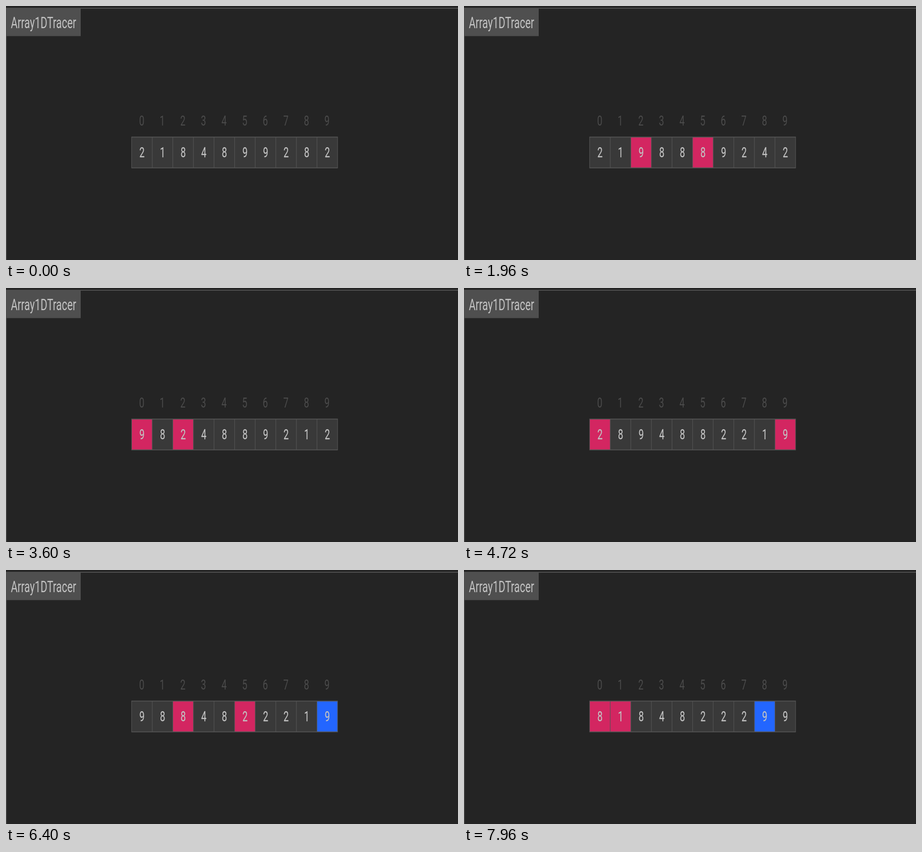
An HTML page for the animation above (8 s loop, 998 by 561 pixels).

```html
<!DOCTYPE html>
<html lang="en">
<head>
<meta charset="utf-8">
<title>Array tracer</title>
<style>
  html, body { margin: 0; width: 100%; height: 100%; overflow: hidden; background: #242424; }
  svg { display: block; width: 998px; height: 561px; }
  text { font-family: Roboto, sans-serif; font-size: 12.6px; fill: #c2c2c2; }
  .mid { text-anchor: middle; }
  .value { stroke: #c2c2c2; stroke-width: 0.12px; }
  .index { fill: #4b4b4b; }
  .title { font-size: 14px; }
</style>
</head>
<body>
<svg id="stage" viewBox="0 0 998 561">
  <rect y="4" width="998" height="2" fill="#505050"/>
  <rect y="4" width="1.4" height="557" fill="#505050"/>
  <rect y="6" width="165" height="60.5" fill="#4f4f4f"/>
</svg>
<script>
const LOOP = 8000, FRAME = 40;
const LEFT = 277.4, PITCH = 45.47, TOP = 289.5, HEIGHT = 68;
const GREY = '#393939', RED = '#d32661', BLUE = '#2366ff', LINE = '#555';
const start = [...'2184899282'];
const stage = document.getElementById('stage');

function add(tag, attrs, content = '') {
  const el = document.createElementNS('http://www.w3.org/2000/svg', tag);
  for (const key in attrs) el.setAttribute(key, attrs[key]);
  el.textContent = content;
  return stage.appendChild(el);
}

function rect(x, y, width, height, fill) {
  return add('rect', { x, y, width, height, fill });
}

function label(x, y, cls, content) {
  return add('text', { class: cls, transform: `translate(${x} ${y}) scale(1.625 2.45)` }, content);
}

// Run a heap sort and record the array and highlights at every step
function traceSort(input) {
  const values = [...input], states = [];
  let selected = -1;

  const record = patched => states.push({ values: [...values], patched, selected });

  function swap(a, b) {
    [values[a], values[b]] = [values[b], values[a]];
    record([a, b]);
  }

  function heapify(size, root) {
    let largest = root;
    for (const child of [2 * root + 1, 2 * root + 2])
      if (child < size && values[child] > values[largest]) largest = child;
    if (largest === root) return;
    swap(root, largest);
    heapify(size, largest);
  }

  record([]);
  for (let i = Math.ceil(values.length / 2) - 1; i >= 0; i--) heapify(values.length, i);
  for (let last = values.length - 1; last > 0; last--) {
    selected = -1;
    swap(0, last);
    selected = last;
    record([]);
    heapify(last, 0);
  }
  return states;
}

const states = traceSort(start);
const stepTime = k => k && FRAME * Math.round(22.25 + 13.6 * k);

label(10.7, 48.7, 'title', 'Array1DTracer');
const boxes = start.map((_, i) => rect(LEFT + i * PITCH, TOP, PITCH, HEIGHT, GREY));
for (let i = 0; i <= start.length; i++)
  rect(LEFT + i * PITCH - 0.6, TOP, 1.2, HEIGHT, LINE);
for (const y of [TOP, TOP + HEIGHT])
  rect(LEFT - 0.6, y - 0.9, PITCH * start.length + 1.2, 1.8, LINE);

const digits = start.map((_, i) => {
  const x = LEFT + (i + 0.5) * PITCH;
  label(x - 0.5, 263.7, 'mid index', i);
  return label(x + 0.2, 333.8, 'mid value');
});

function draw(time) {
  const { values, patched, selected } = states.findLast((_, k) => stepTime(k) <= time);
  values.forEach((value, i) => {
    digits[i].textContent = value;
    boxes[i].setAttribute('fill', patched.includes(i) ? RED : i === selected ? BLUE : GREY);
  });
}

const began = performance.now();
function tick() {
  draw((performance.now() - began) % LOOP);
  requestAnimationFrame(tick);
}
tick();
</script>
</body>
</html>
```
